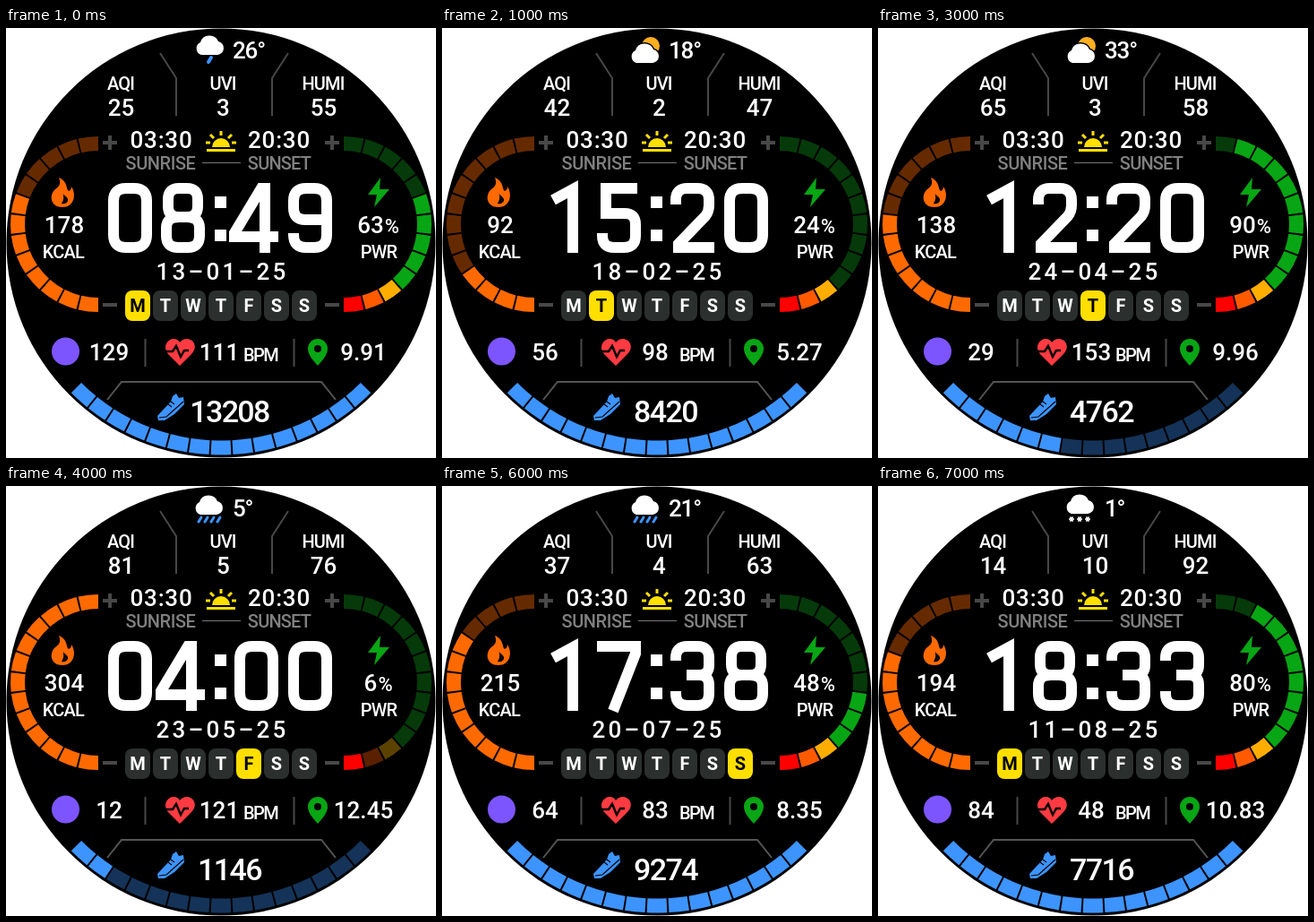
An HTML page with a canvas that plays this animation: 480 by 480 pixels, repeating every 8 s.

```html
<!DOCTYPE html>
<html lang="en">
<head>
<meta charset="utf-8">
<title>Watch face</title>
<style>
html, body { margin: 0; width: 100%; height: 100%; overflow: hidden; background: #fff; }
canvas { display: block; width: 480px; height: 480px; }
</style>
</head>
<body>
<canvas id="face" width="480" height="480"></canvas>
<script>
const ctx = document.getElementById('face').getContext('2d');
const RAD = Math.PI / 180;
const WHITE = '#fff', ORANGE = '#ff6a00', GREEN = '#08a514', YELLOW = '#ffdf00', BLUE = '#3d94ff', GREY = '#484848';

const HOLD = 1000;
const SIDE_BARS = 13, STEP_BARS = 15;
const KEYS = ['icon', 'temp', 'aqi', 'uvi', 'humi', 'time', 'date', 'kcal', 'kcalBars',
  'power', 'powerBars', 'score', 'pulse', 'km', 'steps', 'stepBars'];
const SCENES = [
  ['drop', 26, 25, 3, 55, '08:49', '13-01-25', 178, 8, 63, 8, 129, 111, '9.91', 13208, 15],
  ['sunny', 18, 42, 2, 47, '15:20', '18-02-25', 92, 4, 24, 3, 56, 98, '5.27', 8420, 15],
  ['fog', 10, 68, 1, 41, '20:47', '19-03-25', 337, 13, 26, 3, 78, 75, '3.99', 1065, 10],
  ['sunny', 33, 65, 3, 58, '12:20', '24-04-25', 138, 7, 90, 12, 29, 153, '9.96', 4762, 6],
  ['rain', 5, 81, 5, 76, '04:00', '23-05-25', 304, 13, 6, 1, 12, 121, '12.45', 1146, 2],
  ['wind', 8, 10, 12, 51, '11:53', '21-06-25', 490, 13, 7, 1, 89, 45, '7.67', 14957, 15],
  ['rain', 21, 37, 4, 63, '17:38', '20-07-25', 215, 9, 48, 6, 64, 83, '8.35', 9274, 15],
  ['snow', 1, 14, 10, 92, '18:33', '11-08-25', 194, 8, 80, 11, 84, 48, '10.83', 7716, 15]
].map(row => Object.fromEntries(KEYS.map((key, i) => [key, row[i]])));

// Clock numerals, drawn as strokes in a 49 x 78 cell.
const NUMERALS = {
  0: 'M6 20Q6 6 20 6H29Q43 6 43 20V58Q43 72 29 72H20Q6 72 6 58Z',
  1: 'M10 19L32 7V78',
  2: 'M6 24V19Q6 6 19 6H30Q43 6 43 19V25Q43 32 39 37L9 68V72H49',
  3: 'M6 22V19Q6 6 19 6H30Q43 6 43 19V27Q43 38 32 38H18M32 38Q43 38 43 49V59Q43 72 30 72H19Q6 72 6 59V56',
  4: 'M34 78V6H30L0 56V60H49',
  5: 'M45 6H10V34H31Q43 34 43 46V59Q43 72 30 72H19Q6 72 6 59V56',
  7: 'M0 6H43V14L18 78',
  8: 'M8 18Q8 6 20 6H29Q41 6 41 18V26Q41 38 29 38H20Q8 38 8 26ZM20 38H29Q43 38 43 50V59Q43 72 30 72H19Q6 72 6 59V50Q6 38 20 38',
  9: 'M43 41H19Q6 41 6 28V20Q6 6 20 6H29Q43 6 43 20V58Q43 72 29 72H20Q6 72 6 58V56'
};
const CLOUD = 'M8 22A7.5 7.5 0 0 1 7 8A10.5 10 0 0 1 27 7A7.6 7.6 0 0 1 26 22Z';

function fill(path, color, x = 0, y = 0) {
  ctx.save();
  ctx.translate(x, y);
  ctx.fillStyle = color;
  ctx.fill(new Path2D(path));
  ctx.restore();
}

function stroke(path, color, width, x = 0, y = 0, cap = 'butt') {
  ctx.save();
  ctx.translate(x, y);
  ctx.strokeStyle = color;
  ctx.lineWidth = width;
  ctx.lineCap = cap;
  ctx.stroke(new Path2D(path));
  ctx.restore();
}

function disc(x, y, r, color) {
  ctx.fillStyle = color;
  ctx.beginPath();
  ctx.arc(x, y, r, 0, 2 * Math.PI);
  ctx.fill();
}

function text(value, x, y, { size = 26, align = 'center', color = WHITE, spacing = 0, weight = 500 } = {}) {
  ctx.font = `${weight} ${size}px Roboto, sans-serif`;
  ctx.letterSpacing = spacing + 'px';
  ctx.textAlign = align;
  ctx.fillStyle = color;
  ctx.fillText(value, x, y);
}

const label = (value, x, y, options) => text(value, x, y, { size: 20, spacing: -0.8, ...options });

// A ring of bars; a negative sweep runs counter-clockwise.
function gauge(cx, cy, radius, start, sweep, count, colorOf) {
  const step = sweep / count;
  const gap = Math.sign(sweep) * 1 / radius;
  ctx.lineWidth = 16;
  ctx.lineCap = 'butt';
  for (let i = 0; i < count; i++) {
    const from = (start + i * step) * RAD, to = from + step * RAD;
    ctx.strokeStyle = colorOf(i);
    ctx.beginPath();
    ctx.arc(cx, cy, radius, from + (i ? gap : 0), to - (i < count - 1 ? gap : 0), sweep < 0);
    ctx.stroke();
  }
}

function powerColor(i, lit) {
  const [on, off] = [['#f00', '#500'], ['#ff5a00', '#5a2000'], ['#ffae00', '#5c4200']][i] || [GREEN, '#063a0a'];
  return i < lit ? on : off;
}

const WEATHER = {
  drop() {
    fill(CLOUD, WHITE, 210, 8);
    stroke('M229 33L226 38', BLUE, 4, 0, 0, 'round');
  },
  sunny() {
    disc(233, 20, 10, '#ffae20');
    stroke(CLOUD, '#000', 3, 209, 17);
    fill(CLOUD, WHITE, 209, 17);
  },
  fog() {
    stroke('M213 15H236M225 25.5H242M213 36H216M222 36H242', WHITE, 4.5, 0, 0, 'round');
  },
  rain() {
    fill(CLOUD, WHITE, 209, 10);
    for (const x of [215, 222, 229, 236]) stroke('M3 0L0 5', BLUE, 3, x, 35, 'round');
  },
  wind() {
    stroke('M212 21H225Q230 20 229 15Q226 10 222 14M212 27H237Q243 25 241 19Q237 15 234 19' +
      'M217 33H228Q233 35 230 40Q226 42 224 38M212 15H216M235 33H240', WHITE, 3, 0, 0, 'round');
  },
  snow() {
    fill(CLOUD, WHITE, 208, 9);
    for (const x of [216, 225, 234]) stroke('M-3 0H3M-1.5 -2.6L1.5 2.6M1.5 -2.6L-1.5 2.6', WHITE, 1.6, x, 37);
  }
};

function drawClock(time) {
  [...time].forEach((char, i) => {
    if (char !== ':') stroke(NUMERALS[char], WHITE, 12, [114, 173, 0, 255, 315][i], 173);
  });
  ctx.fillStyle = WHITE;
  ctx.fillRect(233, 188, 13, 13);
  ctx.fillRect(233, 225, 13, 13);
}

function drawDays(active) {
  [...'MTWTFSS'].forEach((day, i) => {
    const x = 133 + 31 * i;
    ctx.fillStyle = i === active ? YELLOW : '#2b302f';
    ctx.beginPath();
    ctx.roundRect(x, 293, 28, 34, 8);
    ctx.fill();
    label(day, x + 14, 317, { color: i === active ? '#000' : WHITE, spacing: 0, weight: 600 });
  });
}

function drawIcons() {
  // flame and bolt
  fill('M59 167C69 171 67 180 70 182Q73 181 73 177C79 186 76 200 63 200C49 200 48 186 55 180C61 176 61 172 59 167Z', ORANGE);
  fill('M63 183C64 188 70 188 69 193Q67 197 62 196Q66 190 63 183Z', '#000');
  fill('M418 167L404 186H414L411 200L428 180H417Z', GREEN);

  // sunrise
  fill('M230 133A10 10 0 0 1 250 133Z', YELLOW);
  stroke('M224 136.5H256', YELLOW, 3);
  stroke('M240 115V120M228 119L232 123M252 119L248 123M223 128H228M252 128H257', YELLOW, 3);

  disc(66.5, 361, 15.5, '#7d55ff');

  // heart
  fill('M194 377L181 364C174 355 181 347 187 347Q192 347 194 351Q197 347 202 347C209 347 215 356 207 364Z', '#ff3b42');
  stroke('M177 361H186L190 355L195 367L199 360H204', '#000', 2.5);

  // map pin
  fill('M348 377C343 371 337 365 337 358A11 11 0 0 1 359 358C359 365 353 371 348 377Z', GREEN);
  disc(348, 358, 4, '#000');

  // shoe
  fill('M169 433L184 417L186 411L190 408L193 413L198 412L199 420L188 431L177 438L170 438Z', BLUE);
  stroke('M171 435L179 434L198 417M181 420L185 423M184 417L188 420', '#000', 1.2);
}

function drawLines() {
  stroke('M172 28L190 56V98M315 28L297 56V98M155.5 347V378M321.5 347V378', GREY, 2);
  stroke('M113 415L129 395H352L368 415', '#555', 2);
  stroke('M219 150.5H262', '#777', 1);
  stroke('M108 128H124M116 120V136M356 128H372M364 120V136M108 309H124M356 309H372', GREY, 4);
}

function drawPower(power) {
  text(power, 407, 229);
  const edge = 407 + ctx.measureText(power).width / 2;
  text('%', edge + 1, 229, { size: 22, align: 'left' });
}

function drawScene(s, index) {
  ctx.fillStyle = WHITE;
  ctx.fillRect(0, 0, 480, 480);
  disc(240, 240, 239.5, '#000');

  gauge(103, 219, 90, 90, 180, SIDE_BARS, i => i < s.kcalBars ? ORANGE : '#662a00');
  gauge(377, 219, 90, 90, -180, SIDE_BARS, i => powerColor(i, s.powerBars));
  gauge(240, 240, 228.5, 135, -90, STEP_BARS, i => i < s.stepBars ? BLUE : '#153358');
  drawLines();
  drawIcons();

  WEATHER[s.icon]();
  text(s.temp + '°', 253, 34, { align: 'left', spacing: -1.2 });
  [['AQI', s.aqi, 128], ['UVI', s.uvi, 242], ['HUMI', s.humi, 354]].forEach(([name, value, x]) => {
    label(name, x, 69);
    text(value, x + 0.5, 98);
  });

  text('03:30', 173.5, 134, { spacing: 0.8 });
  text('20:30', 305, 134, { spacing: 0.8 });
  label('SUNRISE', 172.5, 158, { color: '#808080', spacing: -0.4 });
  label('SUNSET', 305, 158, { color: '#808080' });

  drawClock(s.time);
  text(s.date.replaceAll('-', '–'), 241.5, 281, { spacing: 3.2 });
  drawDays(index % 7);

  text(s.kcal, 65, 229);
  label('KCAL', 64, 257);
  drawPower(s.power);
  label('PWR', 416, 257);

  text(s.score, 115, 371);
  text(s.pulse, 238, 371);
  label('BPM', 265, 372, { align: 'left', spacing: -1.6 });
  text(s.km, 399, 371);
  text(s.steps, 249.5, 440, { size: 34, spacing: -1.6 });
}

function tick(now) {
  const index = Math.floor(now / HOLD) % SCENES.length;
  drawScene(SCENES[index], index);
  requestAnimationFrame(tick);
}
tick(0);
</script>
</body>
</html>
```
